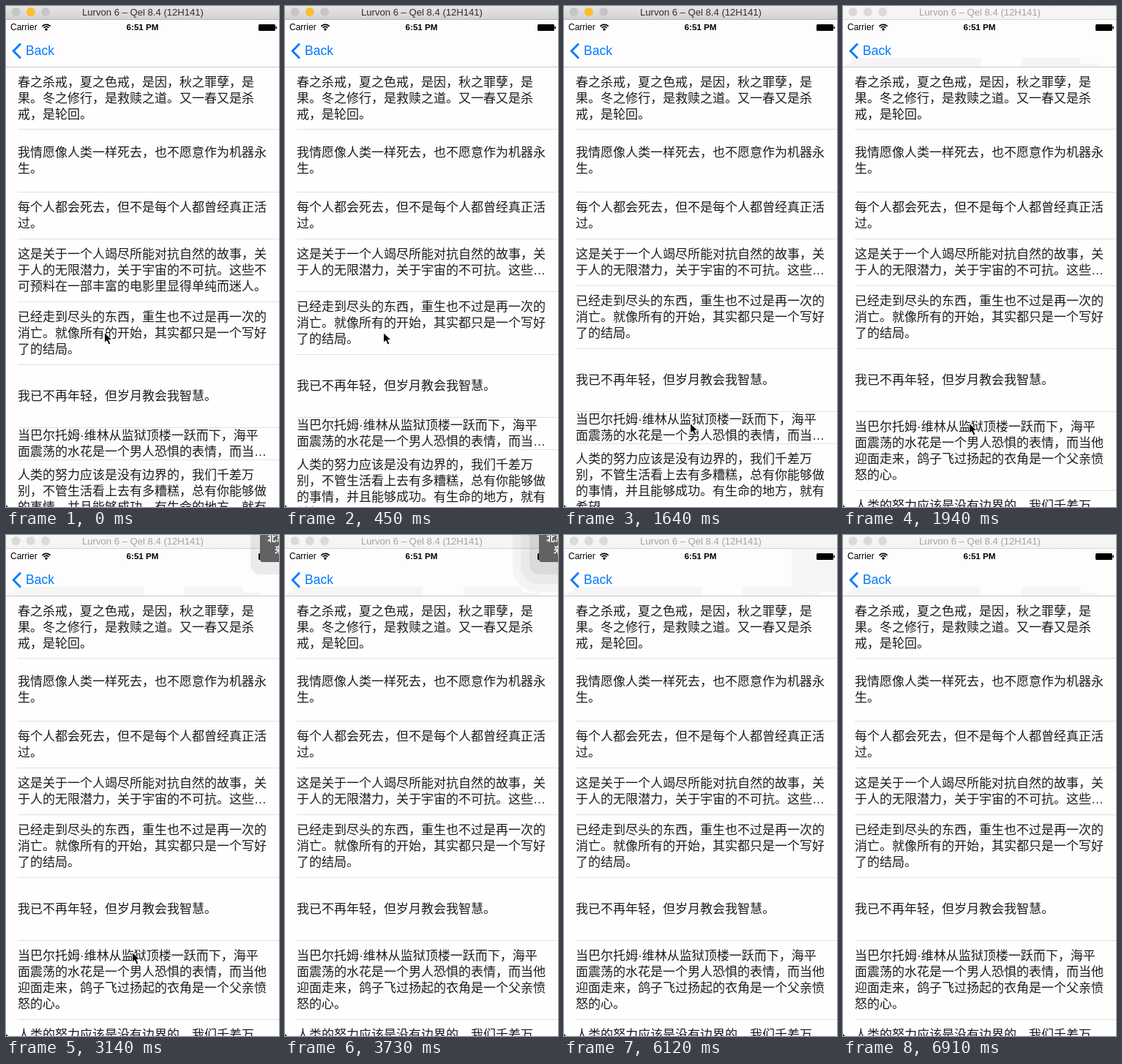
These frames come from a looping animation (373x685 px, 7050 ms). An HTML page with a canvas:

```html
<!DOCTYPE html>
<html lang="zh-CN">
<meta charset="utf-8">
<style>
html, body { margin: 0; width: 100%; height: 100%; overflow: hidden; background: #fff }
canvas { display: block }
</style>
<canvas id="stage" width="373" height="685"></canvas>
<script>
const ctx = document.getElementById('stage').getContext('2d');
const LOOP = 7050;
const SANS = '"Liberation Sans", "Noto Sans CJK SC", "Noto Sans CJK", sans-serif';

const quotes = [
  '春之杀戒，夏之色戒，是因，秋之罪孽，是|果。冬之修行，是救赎之道。又一春又是杀|戒，是轮回。',
  '我情愿像人类一样死去，也不愿意作为机器永|生。',
  '每个人都会死去，但不是每个人都曾经真正活|过。',
  '这是关于一个人竭尽所能对抗自然的故事，关|于人的无限潜力，关于宇宙的不可抗。这些不|可预料在一部丰富的电影里显得单纯而迷人。',
  '已经走到尽头的东西，重生也不过是再一次的|消亡。就像所有的开始，其实都只是一个写好|了的结局。',
  '我已不再年轻，但岁月教会我智慧。',
  '当巴尔托姆·维林从监狱顶楼一跃而下，海平|面震荡的水花是一个男人恐惧的表情，而当他|迎面走来，鸽子飞过扬起的衣角是一个父亲愤|怒的心。',
  '人类的努力应该是没有边界的，我们千差万|别，不管生活看上去有多糟糕，总有你能够做|的事情，并且能够成功。有生命的地方，就有|希望。'
].map(s => s.split('|'));

// Pointer keys: start time, x, y (no position hides it)
const pointer = [
  [0, 134, 446], [890, 166, 528], [1040, 171, 567], [1190, 172, 570],
  [3280, 227, 374], [3430, 290, 184], [3730],
  [5680, 282, 554], [5830, 289, 588], [5970, 313, 683], [6120]
];

const within = (t, a, b) => t >= a && t < b;

function rect(color, x, y, w, h) {
  ctx.fillStyle = color;
  ctx.fillRect(x, y, w, h);
}

function text(s, x, y, size, color = '#000', align = 'left', weight = 'normal') {
  ctx.font = `${weight} ${size}px ${SANS}`;
  ctx.textAlign = align;
  ctx.fillStyle = color;
  ctx.fillText(s, x, y);
}

function dot(x, y, r, color) {
  ctx.beginPath();
  ctx.arc(x, y, r, 0, 7);
  ctx.fillStyle = color;
  ctx.fill();
}

function list(t) {
  const heights = [84, 86, 64, t < 450 ? 86 : t < 590 ? 72 : 64, 86, 86, t < 1790 ? 44 : 108, 108];
  let top = 84;
  quotes.forEach((full, i) => {
    const short = i == 3 && t >= 300 || i == 6 && t < 1790;
    const lines = short ? [full[0], full[1].slice(0, -1) + '…'] : full;
    const middle = top + (i == 3 && short ? 64 : heights[i]) / 2;
    lines.forEach((line, n) =>
      text(line, 16, Math.round(middle + (n - (lines.length - 1) / 2) * 21.7 + 6), 17, '#1c1c1c', 'left', 350));
    top += heights[i];
    rect('#e1e1e3', 16, top, 357, 1);
  });
}

function navBar(t, active) {
  rect('#fdfdfd', 0, 18, 373, 65);
  if (!active) {
    if (within(t, 5230, 6420)) rect('#f6f6f6', 311, 18, 62, 60);
    rect('#f5f5f5', 12, 71, 176, 12);
    rect('#f5f5f5', 4, 79, 184, 4);
    rect('#f5f5f5', 244, 71, 80, 12);
    rect('#f5f5f5', 244, 79, 104, 4);
  }
  rect('#c8c8ca', 0, 83, 373, 1);

  text('Carrier', 6, 33, 12);
  text('6:51 PM', 186.5, 33, 11.6, '#000', 'center', 'bold');
  ctx.strokeStyle = '#000';
  ctx.lineWidth = 1.7;
  for (const r of [4.6, 7.6]) {
    ctx.beginPath();
    ctx.arc(55, 33, r, -Math.PI * .76, -Math.PI * .24);
    ctx.stroke();
  }
  dot(55, 32, 1.7, '#000');

  ctx.fillStyle = '#000';
  ctx.beginPath();
  ctx.roundRect(345, 25, 23, 9, 1.5);
  ctx.fill();
  rect('#000', 368.5, 28, 1.5, 3);

  ctx.strokeStyle = '#007aff';
  ctx.lineWidth = 2.8;
  ctx.stroke(new Path2D('M20 51.5L10.2 61.5L20 71.5'));
  text('Back', 27, 67, 17.5, '#007aff');
}

function titleBar(active) {
  const shade = ctx.createLinearGradient(0, 0, 0, 18);
  shade.addColorStop(0, active ? '#e6e6e6' : '#f6f6f6');
  shade.addColorStop(1, active ? '#d2d2d2' : '#f4f4f4');
  rect(shade, 0, 0, 373, 18);
  rect(active ? '#b4b4b4' : '#d6d6d6', 0, 18, 373, 1);
  const off = active ? '#c6c6c6' : '#dadada';
  [off, active ? '#fdbd30' : off, off].forEach((c, i) => dot(13.5 + i * 20.3, 8, 6, c));
  text('Lurvon 6 – Qel 8.4 (12H141)', 187, 13, 13.1, active ? '#303030' : '#a4a4a4', 'center');
}

function corner(x, y, radius, color) {
  ctx.beginPath();
  ctx.roundRect(x, -60, 500, y + 60, radius);
  ctx.fillStyle = color;
  ctx.fill();
}

function banner(t) {
  if (t >= 3280) {
    corner(311, 78, 34, 'rgba(0,0,0,.035)');
    corner(322, 67, 24, 'rgba(0,0,0,.04)');
  }
  corner(334, 54, 14, 'rgba(0,0,0,.07)');
  corner(347, 37, 4, '#626262');
  text('北京', 357, 9, 12, '#fff', 'left', 'bold');
  text('来', 367, 25, 12, '#fff', 'left', 'bold');
}

const arrow = new Path2D('M.5 .5V14.5L3.8 11.5L6.2 17L8.8 15.9L6.5 10.5H11Z');
function drawPointer(t) {
  const [, x, y] = pointer.findLast(k => k[0] <= t);
  if (x === undefined) return;
  ctx.save();
  ctx.translate(x, y);
  ctx.fillStyle = '#000';
  ctx.fill(arrow);
  ctx.strokeStyle = '#fff';
  ctx.lineWidth = 1;
  ctx.stroke(arrow);
  ctx.restore();
}

function draw(now) {
  const t = now % LOOP;
  const active = !(within(t, 1340, 1640) || within(t, 1940, 6420) || t >= 6910);
  rect('#fefefe', 0, 0, 373, 685);
  list(t);
  navBar(t, active);
  titleBar(active);
  if (within(t, 3140, 5230)) banner(t);
  drawPointer(t);
  ctx.fillStyle = '#333';
  ctx.fill(new Path2D('M0 682L3 685H0Z'));
  requestAnimationFrame(draw);
}
requestAnimationFrame(draw);
</script>
</html>
```
